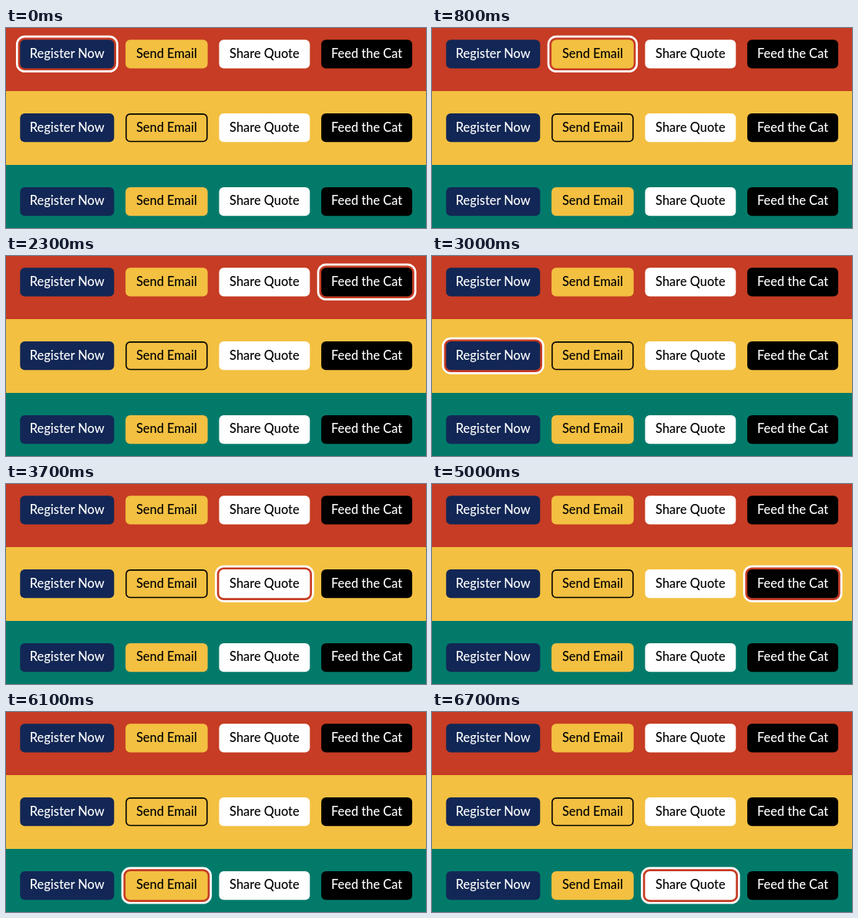
These frames come from a looping animation (545x260 px, 6.8 s). An HTML page:

```html
<!DOCTYPE html>
<html lang="en">
<head>
<meta charset="utf-8">
<title>Button focus rings</title>
<style>
  html, body { margin: 0; width: 100%; height: 100%; overflow: hidden; }
  svg { display: block; }
  text { font: 500 16.4px Lato, sans-serif; text-anchor: middle; }
</style>
</head>
<body>
<svg id="stage" width="545" height="260"></svg>
<script>
  const LOOP = 6800;
  const HEIGHT = 37.2;
  const RADIUS = 6;
  const RING = 2.7;
  const RED = "#c63c24", YELLOW = "#f3c041", TEAL = "#027a6a";
  const ROWS = [
    { top: 0, fill: RED },
    { top: 82, fill: YELLOW },
    { top: 178, fill: TEAL }
  ];
  const KINDS = [
    { label: "Register Now", x: 18.3, width: 122, fill: "#122755", ink: "#fff" },
    { label: "Send Email", x: 155.1, width: 106.6, fill: YELLOW, ink: "#000" },
    { label: "Share Quote", x: 276.5, width: 117.8, fill: "#fff", ink: "#000" },
    { label: "Feed the Cat", x: 409.1, width: 118, fill: "#000", ink: "#fff" }
  ];
  // When each button, in tab order, receives focus (ms).
  const FOCUS_TIMES = [0, 600, 1200, 1800, 2500, 3100, 3700, 4400, 5100, 5800, 6300];

  function add(parent, tag, attributes) {
    const el = document.createElementNS("http://www.w3.org/2000/svg", tag);
    for (const name in attributes) el.setAttribute(name, attributes[name]);
    parent.append(el);
    return el;
  }

  // Rounded box around a button, grown outwards by `grow`.
  function box(parent, kind, y, grow, fill) {
    return add(parent, "rect", {
      x: kind.x - grow,
      y: y - grow,
      width: kind.width + 2 * grow,
      height: HEIGHT + 2 * grow,
      rx: RADIUS + grow,
      fill
    });
  }

  const stage = document.getElementById("stage");
  for (const { top, fill } of ROWS) {
    add(stage, "rect", { y: top, width: 545, height: 260 - top, fill });
  }

  const rings = ROWS.flatMap((row, r) => KINDS.map(kind => {
    const y = 15.2 + 95.9 * r;
    const ring = add(stage, "g", {});
    box(ring, kind, y, 2 * RING, "#fff");
    box(ring, kind, y, RING, RED);
    const sameFill = kind.fill === row.fill;
    box(stage, kind, y, 0, sameFill ? "#000" : kind.fill);
    if (sameFill) box(stage, kind, y, -1.6, kind.fill);
    add(stage, "text", {
      x: kind.x + kind.width / 2,
      y: y + 23.4,
      fill: kind.ink
    }).textContent = kind.label;
    return ring;
  }));

  const start = performance.now();

  function draw() {
    const time = (performance.now() - start) % LOOP;
    const active = FOCUS_TIMES.filter(t => t <= time).length - 1;
    rings.forEach((ring, i) => ring.setAttribute("visibility", i === active ? "visible" : "hidden"));
    requestAnimationFrame(draw);
  }
  draw();
</script>
</body>
</html>
```
